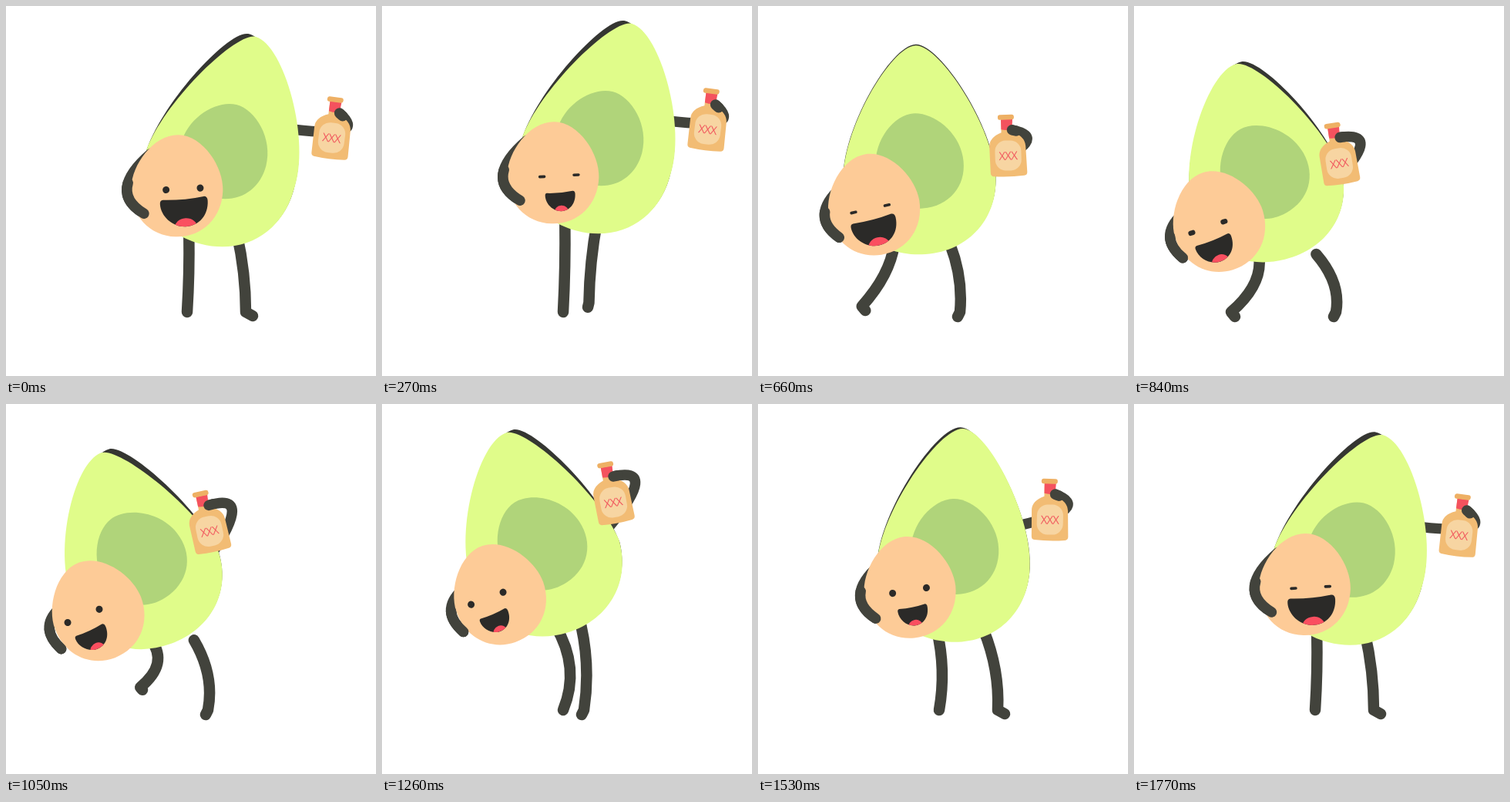
Recreate the animation shown at these times as an HTML page. Size 480 px wide and 480 px high, loop 1.8 s.

```html
<!DOCTYPE html>
<html lang="en">
<head>
<meta charset="utf-8">
<title>Tipsy avocado</title>
<style>
  html, body { margin: 0; width: 100%; height: 100%; overflow: hidden; background: #fff; }
  svg { display: block; width: 100%; height: 100%; }
  .limb { fill: none; stroke: #42433c; stroke-linecap: round; stroke-linejoin: round; stroke-width: 13.5; }
  .leg { stroke-width: 14.5; }
  .ink { fill: #2b2a28; }
  text { font: 300 14.5px "Open Sans", "Noto Sans", sans-serif; fill: #f0505a; stroke: #f0505a; stroke-width: .3; text-anchor: middle; }
</style>
</head>
<body>
<svg viewBox="0 0 480 480">
  <defs>
    <path id="mouthShape" d="M-27 1Q0 3 26-1Q31-1 31 5C31 24 18 37 1 37C-16 37-31 22-31 6Q-31 1-27 1Z"/>
    <clipPath id="mouthClip"><use href="#mouthShape"/></clipPath>
  </defs>
  <path id="legL" class="limb leg"/>
  <path id="legR" class="limb leg"/>
  <path id="armR" class="limb"/>
  <path id="skin" fill="#353632"/>
  <path id="flesh" fill="#e0fc8a"/>
  <path id="pit" fill="#b0d47a" d="M0-63C26-63 57-32 57 4C57 37 34 61 0 61C-34 61-57 37-57 4C-57-32-26-63 0-63Z"/>
  <path id="armL" class="limb"/>
  <path id="seed" fill="#fdcb97" d="M0-66C32-66 59.5-26 59.5 4C59.5 40 34 66 0 66C-34 66-59.5 40-59.5 4C-59.5-26-32-66 0-66Z"/>
  <g id="face">
    <rect id="eyeL" class="ink"/>
    <rect id="eyeR" class="ink"/>
    <g id="mouth">
      <use href="#mouthShape" class="ink"/>
      <ellipse cx="1" cy="39" rx="15" ry="13" fill="#fa4f60" clip-path="url(#mouthClip)"/>
    </g>
  </g>
  <path id="handL" class="limb" pathLength="1" stroke-dasharray=".5 2"/>
  <g id="bottle">
    <path fill="#f2bc74" d="M-23.5 22L-24-12Q-24-24-8-30V-47H6V-30Q22-25 23-12L24 22Q24 26 20 26.5Q0 28.5-20 26.5Q-23.5 26-23.5 22Z"/>
    <path fill="#f4525e" d="M-8-47H7L6-34Q-1-32-8-34Z"/>
    <rect x="-12" y="-53" width="21" height="6.5" rx="3" fill="#eeb064"/>
    <rect x="-17" y="-19.5" width="34" height="39" rx="14" fill="#f7d5a2"/>
    <text y="5.5">XXX</text>
  </g>
  <path id="handR" class="limb" pathLength="1" stroke-dasharray=".06 2"/>
</svg>
<script>
const LOOP = 1800, STEP = 30;
const $ = id => document.getElementById(id);
const set = (id, attrs) => { for (const k in attrs) $(id).setAttribute(k, attrs[k]); };
const place = (x, y, angle) => `translate(${x} ${y}) rotate(${angle})`;
const mix = (a, b, u) => a + (b - a) * u;

function ramp(t, from, to) {
  const u = Math.min(1, Math.max(0, (t - from) / (to - from)));
  return u * u * (3 - 2 * u);
}

// Smooth looping interpolation through key points of [time, ...values].
function track(rows) {
  const n = rows.length;
  const row = i => rows[(i + n) % n];
  const time = i => row(i)[0] + LOOP * Math.floor(i / n);
  const secant = (i, c) => (row(i + 1)[c] - row(i)[c]) / (time(i + 1) - time(i));
  const slope = (i, c) => {
    const a = secant(i - 1, c), b = secant(i, c);
    const da = time(i) - time(i - 1), db = time(i + 1) - time(i);
    return a && b ? (db * a + da * b) / (da + db) : 0;
  };
  return t => {
    let i = n - 1;
    while (rows[i][0] > t) i--;
    const d = time(i + 1) - time(i), u = (t - time(i)) / d, v = 1 - u;
    return row(i).slice(1).map((p, k) => {
      const c = k + 1, q = row(i + 1)[c];
      return v * v * (1 + 2 * u) * p + u * u * (3 - 2 * u) * q
        + d * u * v * (v * slope(i, c) - u * slope(i + 1, c));
    });
  };
}

// x, y, tilt of the body and height of the bottle above it; all else follows.
const sway = track([
  [0, 279, 208, 15, 37], [270, 279, 191, 15, 31], [510, 246, 206, 8.5, 28],
  [840, 172, 234, -14, 30], [1260, 211, 199.5, -17, 72], [1530, 254, 205, 4, 55]]);
const laugh = track([[0, 1], [270, 0], [510, 1], [840, .45], [1260, 0], [1530, 0], [1770, 1]]);
const eyesOpen = t => 1 - ramp(t, 90, 150) + ramp(t, 780, 900) - ramp(t, 1640, 1740);

// Each foot steps from home to away and back; hip and knee follow foot reach and tilt.
const legs = {
  legL: {
    home: 235, away: 126, out: [470, 700], back: [930, 1190], toeHome: [0, 0], toeAway: [5, 6],
    hip: (reach, tilt) => .3 * reach - 1.1 * tilt - 12,
    bend: (reach, tilt) => 7 - .4 * tilt
  },
  legR: {
    home: 311, away: 262, out: [100, 320], back: [1280, 1490], toeHome: [9, 5], toeAway: [-3, 6],
    hip: (reach, tilt) => .48 * reach - .55 * tilt + 13.5,
    bend: reach => .12 * reach - 1
  }
};

function drawLeg(id, t, x, y, tilt) {
  const g = legs[id];
  const p = ramp(t, ...g.out) - ramp(t, ...g.back);
  const fx = mix(g.home, g.away, p), fy = 397 - 30 * Math.sin(Math.PI * p);
  const toe = g.toeHome.map((v, i) => mix(v, g.toeAway[i], p));
  const reach = fx - x, hx = x + g.hip(reach, tilt), hy = y + 88;
  const kx = (hx + fx) / 2 + 2 * g.bend(reach, tilt);
  set(id, { d: `M${hx} ${hy}Q${kx} ${(hy + fy) / 2} ${fx} ${fy}l${toe}` });
}

// One curve from hand through elbow to shoulder, drawn behind and, near the hand, in front.
function drawArm(side, transform, hand, elbow, shoulder) {
  const bow = elbow.map((e, i) => 2 * e - (hand[i] + shoulder[i]) / 2);
  const d = `M${hand}Q${bow} ${shoulder}`;
  set('arm' + side, { d, transform });
  set('hand' + side, { d, transform });
}

function drawEye(id, cx, open) {
  const w = 9.5 - .5 * open, h = 3.6 + 5.6 * open;
  set(id, { x: cx - w / 2, y: -h / 2, width: w, height: h, rx: h / 2 });
}

const pear = b => `M0-174C${32 + b}-174 ${99 + b}-62 99 5C99 62 58 104 0 104`
  + `C-58 104-99 62-99 5C${-99 + b}-62 ${-32 + b}-174 0-174Z`;

function draw(t) {
  const [x, y, tilt, lift] = sway(t);
  const lunge = ((279 - x) / 107) ** 2;
  const squash = 1 - .06 * lunge;

  const d = pear(.4 * tilt);
  set('flesh', { d, transform: `${place(x, y, tilt)} scale(1 ${squash})` });
  set('skin', { d, transform: `${place(x, y - 1.5, .8 * tilt - .3)} scale(1 ${squash})` });
  set('pit', { transform: place(x + .28 * tilt, y - 19, 1.5 * tilt - 8) });

  const sx = x - 57 - 6 * lunge, sy = y + 35.5 - .68 * tilt;
  set('seed', { transform: place(sx, sy, .64 * tilt - 8) });
  set('face', { transform: place(sx - 3 + .72 * tilt, sy + 4 + 4 * lunge, .56 * tilt - 11.5) });

  const open = eyesOpen(t), [m] = laugh(t);
  drawEye('eyeL', -22.2, open);
  drawEye('eyeR', 22.2, open);
  set('mouth', { transform: `translate(0 ${21 - 9 * m}) scale(${(39 + 23 * m) / 62} ${(25 + 12 * m) / 37})` });

  const drop = (15 - tilt) / 32;
  drawArm('L', place(sx, sy, 0),
    [-43 - 3 * drop, 36 + 13 * drop], [-65 + 3 * drop, 2 + 20 * drop], [-34 - 14 * drop, -42 + 37 * drop]);

  const grip = place(x + 118 + 1.7 * tilt, y - lift, .55 * tilt - 1);
  set('bottle', { transform: grip });
  drawArm('R', grip, [6, -33], [22 - .6 * tilt, -15 + .2 * tilt], [-32 - 1.2 * tilt, 12 - 1.1 * tilt]);

  for (const id in legs) drawLeg(id, t, x, y, tilt);
}

const start = performance.now();
function tick() {
  const t = performance.now() - start;
  draw(Math.floor(t / STEP) * STEP % LOOP);
  requestAnimationFrame(tick);
}
tick();
</script>
</body>
</html>
```
